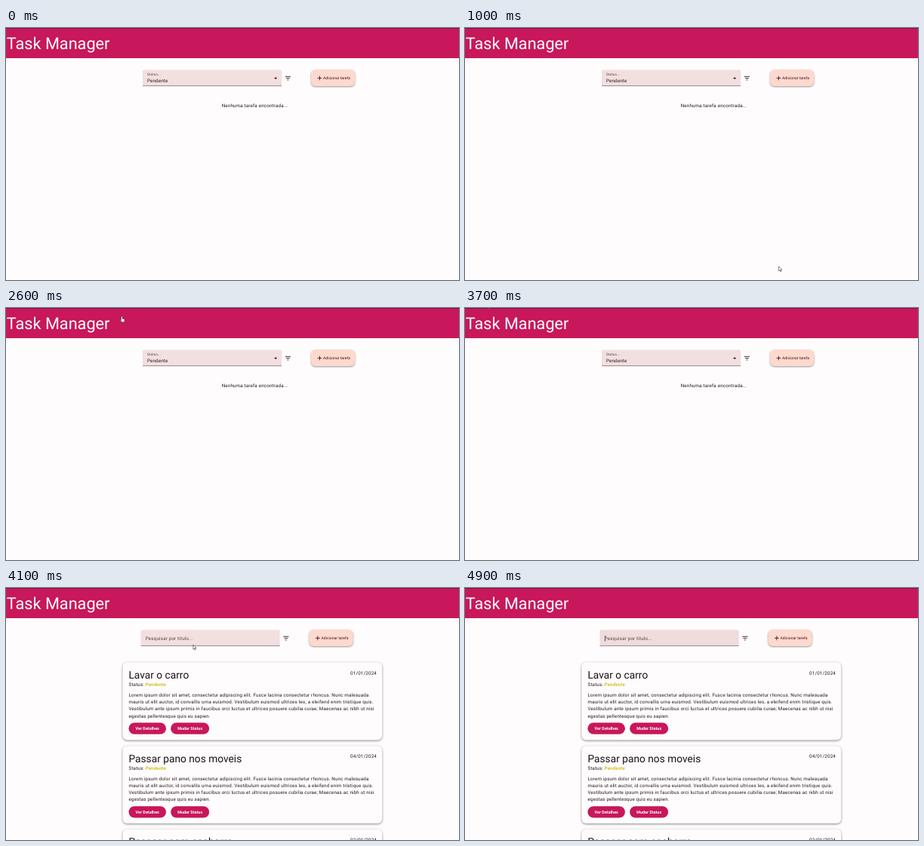
Animation, 600 px wide and 334 px high, one loop 5 s. Source, as an HTML page:

```html
<!DOCTYPE html>
<html lang="pt">
<head>
<meta charset="utf-8">
<title>Task Manager</title>
<style>
  html, body { margin: 0; width: 100%; height: 100%; overflow: hidden; background: #fefcfd; }
  svg { display: block; width: 100%; height: 100%; font-family: Roboto, sans-serif; text-rendering: geometricPrecision; }
  .body { font-size: 6.25px; letter-spacing: .165px; fill: #29191d; }
  .title { font-size: 13.75px; fill: #1c1115; }
  .status { font-weight: 700; font-style: italic; fill: #d2c121; }
  .pill { font-size: 5.47px; font-weight: 700; fill: #fff; text-anchor: middle; }
  .hint { fill: #594047; }
  .card { fill: #fefcfd; filter: drop-shadow(0 1.2px 1.4px #0007); }
  .add { fill: #ffd9ce; filter: drop-shadow(0 1.2px 1.3px #0006); }
  .line { fill: none; stroke: #35151e; stroke-width: .9; }
</style>
</head>
<body>
<svg id="stage" viewBox="0 0 600 334"></svg>
<script>
const LOOP = 5000, STEP = 100, PAGE_SWITCH = 3800, FIELD_HOVER = 4900;
const PINK = '#c8175a';

const text = (x, y, content, cls = 'body', extra = '') =>
  `<text x="${x}" y="${y}" class="${cls}" ${extra}>${content}</text>`;
const rect = (x, y, w, h, fill, r = 0, extra = '') =>
  `<rect x="${x}" y="${y}" width="${w}" height="${h}" rx="${r}" fill="${fill}" ${extra}/>`;

const paragraph = [
  'Lorem ipsum dolor sit amet, consectetur adipiscing elit. Fusce lacinia consectetur rhoncus. Nunc malesuada',
  'mauris ut elit auctor, id convallis urna euismod. Vestibulum euismod ultrices leo, a eleifend enim tristique quis.',
  'Vestibulum ante ipsum primis in faucibus orci luctus et ultrices posuere cubilia curae; Maecenas ac nibh ut nisi',
  'egestas pellentesque quis eu sapien.'
];

const tasks = [
  ['Lavar o carro', '01/01/2024'],
  ['Passar pano nos moveis', '04/01/2024'],
  ['Passear com cachorro', '02/01/2024']
];

const pill = (x, w, label) =>
  rect(x, 178.6, w, 15.2, PINK, 7.6) + text(x + w / 2, 188.1, label, 'pill');

const card = ([title, date], i) => `<g transform="translate(0 ${i * 110.6})">
  ${rect(154.5, 98.6, 343.7, 102.8, '', 6, 'class="card"')}
  ${text(162.4, 120, title, 'title')}
  ${text(491, 114.7, date, 'body', 'text-anchor="end"')}
  ${text(162.5, 130, 'Status:')}${text(184.6, 130, 'Pendente', 'body status')}
  ${paragraph.map((line, n) => text(162.5, 144 + n * 9.2, line)).join('')}
  ${pill(162.5, 49.5, 'Ver Detalhes')}${pill(218.2, 51, 'Mudar Status')}
</g>`;

const toolbar = field => `
  ${rect(181, 55.6, 184.2, 21, '#f2dfe0', 1.5, 'class="field"')}
  ${rect(181, 76.3, 184.2, .8, '#86696f')}
  ${field}
  <path class="line" d="M369.8 64.3h7.2M371 66.6h4.8M372.5 68.9h1.8"/>
  ${rect(404, 55.3, 58.2, 21.8, '', 6, 'class="add"')}
  <path class="line" d="M412.6 66.4h5.6M415.4 63.6v5.6"/>
  ${text(420, 68.2, 'Adicionar tarefa', '', 'font-size="5.07" fill="#35151e"')}`;

const select = text(187, 62.6, 'Status...', 'hint', 'font-size="4.7" letter-spacing=".1"')
  + text(186.9, 71.7, 'Pendente')
  + '<path d="M355 65.8h4.4l-2.2 2.3z" fill="#35151e"/>';
const search = text(187.3, 68.6, 'Pesquisar por titulo...', 'body hint');

const stage = document.getElementById('stage');
stage.innerHTML = `
  ${rect(0, 0, 600, 334, '#fefcfd')}
  <g id="empty">${toolbar(select)}${text(285.7, 105.4, 'Nenhuma tarefa encontrada...')}</g>
  <g id="list">
    <g transform="translate(-2.5 0)">${toolbar(search)}</g>
    ${tasks.map(card).join('')}
  </g>
  ${rect(0, 0, 600, 40, PINK)}${rect(0, 0, 600, 1, '#6d1c42')}
  ${text(.8, 28, 'Task Manager', '', 'font-size="21.7" fill="#fff"')}
  <g id="pointer" stroke-linejoin="round">
    <path id="arrow" d="M0 0v6l1.4-1.2 1 2.2 1-.5-1-2.1h1.8z" fill="#fff" stroke="#333" stroke-width=".6"/>
    <path id="hand" d="M1.3 0q.8 0 .8.8v2.3l2.4.6q.7.3.6 1.1l-.5 2.9H1.5L-.5 4.9q.1-.9 1 0V.8q0-.8.8-.8z" fill="#fff" stroke="#333" stroke-width=".5"/>
    <path id="beam" d="M-1-3h2M0-3v6M-1 3h2" fill="none" stroke="#333" stroke-width=".6"/>
  </g>`;

// Pointer track: time, x, y and the shape used from that time on.
const track = [
  [0, 425, 140, ''], [200, 425, 150, 'arrow'], [700, 416, 303, 'arrow'],
  [1000, 415.6, 316, 'arrow'], [1100, 415.6, 316, 'arrow'], [1300, 418, 320, 'arrow'],
  [1700, 428, 148, 'arrow'], [1800, 428, 148, 'arrow'], [2200, 434, 68, 'hand'],
  [2400, 434, 66, 'hand'], [2600, 152, 11, 'hand'], [2700, 90, 5, 'arrow'],
  [2900, 37, 0, 'arrow'], [3000, 30, -8, ''], [3700, 29, -6, 'arrow'],
  [3800, 136.6, 18.8, 'arrow'], [4200, 285, 94, 'arrow'], [4500, 303.6, 105, 'arrow'],
  [4800, 225, 80, 'arrow'], [4900, 185.6, 67, 'beam'], [5000, 185.6, 67, 'beam']
];

const find = id => document.getElementById(id);
const show = (id, visible) => { find(id).style.display = visible ? '' : 'none'; };
const searchField = document.querySelector('#list .field');

function draw(now) {
  const t = Math.floor(now % LOOP / STEP) * STEP;
  const next = track.findIndex(key => key[0] > t);
  const [t0, x0, y0, shape] = track[next - 1];
  const [t1, x1, y1] = track[next];
  const k = (t - t0) / (t1 - t0);

  show('empty', t < PAGE_SWITCH);
  show('list', t >= PAGE_SWITCH);
  searchField.setAttribute('fill', t >= FIELD_HOVER ? '#f0dcdd' : '#f2dfe0');
  for (const id of ['arrow', 'hand', 'beam']) show(id, id === shape);
  find('pointer').setAttribute('transform', `translate(${x0 + (x1 - x0) * k} ${y0 + (y1 - y0) * k})`);
  requestAnimationFrame(() => draw(performance.now() - start));
}

const start = performance.now();
draw(0);
</script>
</body>
</html>
```
